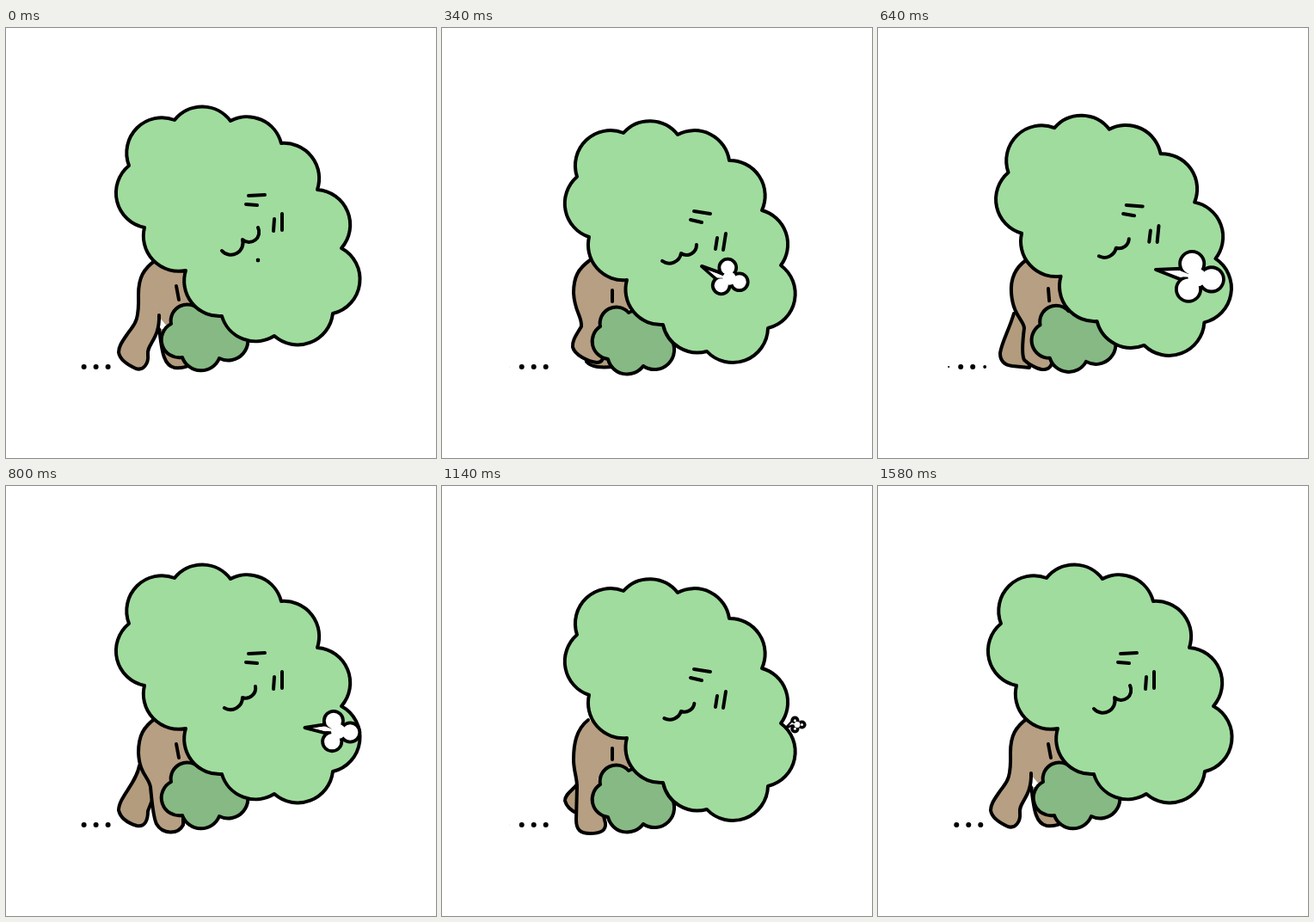
These frames come from a looping animation (500x500 px, 1600 ms). An HTML page with a canvas:

```html
<!DOCTYPE html>
<html>
<head>
<meta charset="utf-8">
<title>Walking tree</title>
<style>
html, body { margin: 0; width: 100%; height: 100%; overflow: hidden; background: #fff; }
canvas { display: block; width: 100vw; height: 100vh; object-fit: contain; }
</style>
</head>
<body>
<canvas id="stage"></canvas>
<script>
const LOOP = 1600, POSE = 200;
const LEAF = '#a0dc9e', BUSH = '#86b983', BARK = '#b69f82', FAR_BARK = '#b29c7d';

const canvas = document.getElementById('stage');
const dpr = window.devicePixelRatio || 1;
canvas.width = canvas.height = 500 * dpr;
const ctx = canvas.getContext('2d');
ctx.scale(dpr, dpr);
ctx.lineCap = ctx.lineJoin = 'round';

// Notches between the crown's lobes, upright and sunk
const crownUp = [[196,107],[261,108],[320,134],[362,188],[390,256],[380,332],
  [312,358],[251,335],[209,282],[161,232],[143,160]];
const crownLow = [[211,122],[274,124],[334,154],[372,212],[394,276],[379,349],
  [308,376],[257,345],[215,293],[171,243],[157,173]];
const bushUp = [[277,350],[248,384],[205,383],[192,344],[225,328]];
const bushLow = [[266,361],[234,393],[193,385],[184,347],[217,331]];
const bushR = [23, 23, 20.8, 19];

// Pairs of points: two brows, two cheek marks
const faceUp = [[282,195],[301,194],[279,205],[292,206],[312,222],[311,236],[321,216],[321,235]];
const faceLow = [[293,213],[312,216],[289,223],[302,226],[320,244],[318,257],[330,239],[327,258]];
const mouthUp = [[251,259],[275,246],[293,232]];
const mouthLow = [[256,271],[278,262],[296,252]];
const seamUp = [[198,300],[201,316]];
const seamLow = [[198,305],[198,318]];

const sink = [0, .38, 1, .61];
const bushSink = [0, .4, 1, .43];

// [near leg, far leg] for each step of the walk
const legs = [
  ['M174 270C160 280 154 290 154 310C155 345 148 345 141 356C134 366 131 371 131 377C132 385 140 391 151 396C160 399 166 390 165 380C163 368 179 362 178 334',
   'M178 350C181 368 181 392 196 395C204 396 212 394 214 390L214 350'],
  ['M174 268C160 280 153 295 153 318C154 345 131 357 131 369C133 380 145 387 155 389C162 389 165 384 165 374C166 362 178 358 178 336',
   'M168 340L168 388C168 402 176 403 186 402C198 402 202 396 200 385L200 340'],
  ['M172 270C158 280 153 290 153 308C154 330 163 335 162 347C157 356 151 363 152 371C154 380 170 388 180 389C186 389 188 384 188 378',
   'M166 360L168 388C174 395 185 395 200 394L200 350'],
  ['M172 270C158 280 154 293 155 308C157 335 170 340 170 349C168 365 167 380 170 386C176 392 188 398 194 397C201 396 204 390 202 380',
   'M158 332C152 352 144 365 142 378C142 388 148 392 156 393L176 395L180 340'],
  ['M174 270C160 280 154 290 154 310C155 335 166 338 168 350C170 370 171 385 175 393C182 405 200 406 206 394L206 380',
   'M155 325C152 345 131 362 131 377C133 386 142 392 152 395C162 397 165 388 165 378L178 345'],
  ['M172 270C158 282 153 295 153 312C154 336 166 335 167 352C167 375 165 385 168 396C171 405 180 404 188 404C198 403 202 399 201 390L198 385',
   'M156 332C150 346 131 358 131 369C133 380 145 387 156 389C163 388 166 384 165 374L170 350'],
  ['M170 272C156 283 153 300 153 318C153 332 157 338 157 350L156 388C156 400 161 404 172 404C184 404 191 401 190 392L188 384',
   'M157 347C152 354 143 358 143 366C145 374 151 378 158 381L170 370'],
  ['M172 270C158 280 154 290 154 305C153 345 150 345 146 354C140 367 138 372 138 380C139 388 150 396 160 398C169 398 172 391 170 380C169 368 181 362 180 334',
   'M172 360L176 378C183 385 190 387 200 386L200 350']
].map(pair => pair.map(d => new Path2D(d)));
const trunk = new Path2D('M170 273L220 275L220 325L190 350L178 336L162 310Z');

// time, centre x, y, lobe distance, turn in degrees, tail x, y
const puffKeys = [
  [0, 293, 270, 0, 25, 293, 270],
  [340, 334, 291, 12.5, 20, 302, 277],
  [640, 371, 290, 17, 8, 323, 281],
  [960, 402, 281, 10.5, 0, 372, 281],
  [1140, 413, 277.5, 5.5, 0, 401, 280.5],
  [1240, 417, 276, 0, 0, 414, 277]
];

const mix = (a, b, k) => a + (b - a) * k;
const blend = (a, b, k) => a.map((p, i) => [mix(p[0], b[i][0], k), mix(p[1], b[i][1], k)]);
const clamp = v => Math.max(0, Math.min(1, v));
const smooth = v => { v = clamp(v); return v * v * (3 - 2 * v); };
const arc = (r, p, sweep) => `A${r} ${r} 0 0 ${sweep} ${p[0]} ${p[1]}`;

function paint(path, fill, width = 4) {
  if (fill) { ctx.fillStyle = fill; ctx.fill(path); }
  if (width) { ctx.strokeStyle = '#000'; ctx.lineWidth = width; ctx.stroke(path); }
}

function dashes(pts) {
  let d = '';
  for (let i = 0; i < pts.length; i += 2) d += `M${pts[i]}L${pts[i + 1]}`;
  paint(new Path2D(d), null);
}

function disc(x, y, r, fill) {
  ctx.fillStyle = fill;
  ctx.beginPath();
  ctx.arc(x, y, r, 0, 7);
  ctx.fill();
}

function drawCrown(w) {
  const pts = blend(crownUp, crownLow, w);
  let d = 'M' + pts[0];
  for (let i = 1; i <= pts.length; i++) d += arc(41, pts[i % pts.length], 1);
  paint(new Path2D(d + 'Z'), LEAF);
}

function drawBush(w) {
  const pts = blend(bushUp, bushLow, w);
  let d = 'M' + pts[0];
  bushR.forEach((r, i) => d += arc(r, pts[i + 1], 1));
  paint(new Path2D(d + 'L250 315Z'), BUSH);
}

function drawFace(w, t) {
  dashes(blend(faceUp, faceLow, w));
  const pts = blend(mouthUp, mouthLow, w);
  const purse = smooth((t - 320) / 260) * (1 - smooth((t - 1080) / 260));
  pts[0][0] += 2.8 * purse;
  pts[0][1] -= purse;
  pts[2][0] -= 3 * purse;
  pts[2][1] += purse;
  paint(new Path2D('M' + pts[0] + arc(14, pts[1], 0) + arc(11.6, pts[2], 0)), null);
}

function drawPuff(t) {
  const i = puffKeys.findIndex(k => k[0] > t) - 1;
  if (i < 0) return;
  const a = puffKeys[i], b = puffKeys[i + 1];
  const k = (t - a[0]) / (b[0] - a[0]);
  const [, x, y, d, turn, tx, ty] = a.map((v, j) => mix(v, b[j], k));
  const inner = Math.max(0, d * .93 - 3.6);
  const edge = Math.min(3.8, 2.2 + d * .25);
  const lobes = [-118, 0, 118].map(g => {
    const q = (g + turn) * Math.PI / 180;
    return [x + d * Math.cos(q), y + d * Math.sin(q)];
  });
  const up = [x - 1.1 * d, y - .6 * d], low = [x - 1.15 * d, y + .12 * d];
  if (d > 1) paint(new Path2D(`M${tx} ${ty}L${up}L${x} ${y}L${low}Z`), '#fff', Math.min(4, d * .6));
  for (const [lx, ly] of lobes) disc(lx, ly, inner + edge, '#000');
  if (!inner) return;
  for (const [lx, ly] of lobes) disc(lx, ly, inner, '#fff');
  disc(x, y, d * .62, '#fff');
  const mx = (up[0] + low[0]) / 2, my = (up[1] + low[1]) / 2;
  const h = d * .2;
  paint(new Path2D(`M${mix(tx, mx, .4)} ${mix(ty, my, .4)}L${mx} ${my - h}L${x} ${y}L${mx} ${my + h}Z`), '#fff', 0);
}

// Ground dots slide back and shrink at both ends
function drawDots(t) {
  const shift = ((6.6 - t * .035) % 14 + 14) % 14;
  for (let x = 70 + shift; x < 132; x += 14) {
    const size = Math.min(clamp((x - 78) / 12), clamp((130 - x) / 9));
    if (size > 0) disc(x, 394, 3 * size, '#000');
  }
}

function draw(t) {
  const pose = Math.round(t / POSE) % 8;
  const w = sink[pose % 4];
  const [near, far] = legs[pose];
  ctx.fillStyle = '#fff';
  ctx.fillRect(0, 0, 500, 500);
  drawDots(t);
  paint(far, FAR_BARK);
  paint(trunk, BARK, 0);
  paint(near, BARK);
  dashes(blend(seamUp, seamLow, w));
  drawBush(bushSink[pose % 4]);
  drawCrown(w);
  drawFace(w, t);
  drawPuff(t);
}

let start;
function tick(now) {
  if (start === undefined) start = now;
  draw((now - start) % LOOP);
  requestAnimationFrame(tick);
}
draw(0);
requestAnimationFrame(tick);
</script>
</body>
</html>
```
